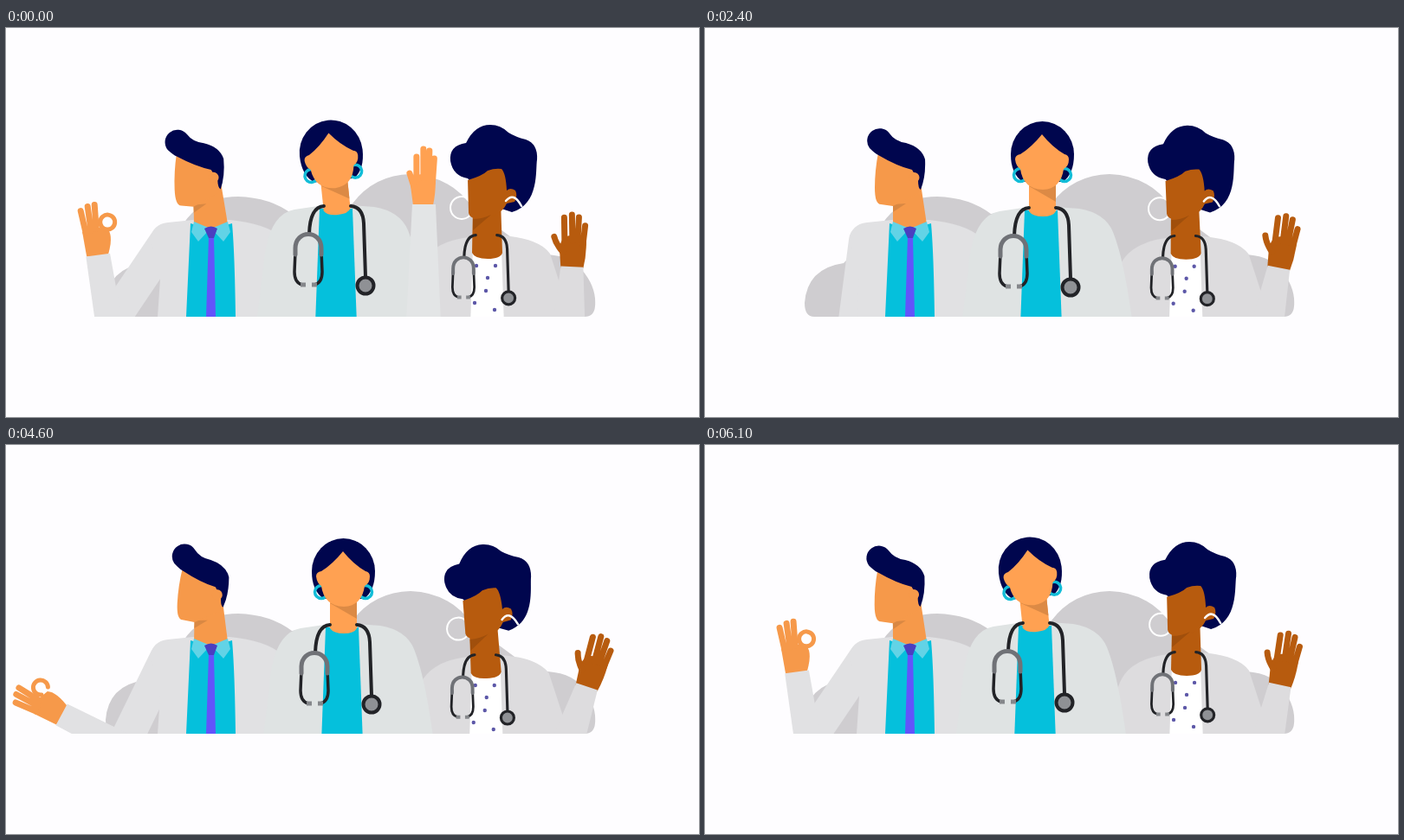
Recreate the animation shown at these times as an HTML page. Size 800 by 450 pixels, loop 6.2 s.

```html
<!DOCTYPE html>
<html lang="en">
<head>
<meta charset="utf-8">
<title>Three doctors waving</title>
<style>
  html, body { margin: 0; width: 100%; height: 100%; overflow: hidden; background: #fefdff; }
  svg { display: block; width: 100vw; height: 100vh; }
  .hair { fill: #00064e; }
  .skinA { fill: #f6994a; }
  .skinB { fill: #ffa152; }
  .skinC { fill: #b75b0e; }
  .teal { fill: #05c0dc; }
  .coatA { fill: #e1e1e3; }
  .coatB { fill: #dfe3e3; }
  .coatC { fill: #dddcde; }
  .line { fill: none; stroke-linecap: round; stroke-linejoin: round; }
  .finger { fill: none; stroke-linecap: round; stroke-width: 7; }
</style>
</head>
<body>
<svg viewBox="0 0 800 450">
  <defs>
    <clipPath id="ground"><rect width="800" height="334"/></clipPath>
    <g id="stethoscope">
      <path class="line" stroke="#222327" stroke-width="4" d="M1 0Q2 -31 18 -32M49 -32Q63 -31 64 -12L66 50"/>
      <path class="line" stroke="#222327" stroke-width="3.5" d="M-15 20L-16 44Q-16 57 -7 59M15 20L16 44Q16 57 7 59"/>
      <path class="line" stroke="#707277" stroke-width="5" stroke-linecap="butt" d="M-15 24V17C-15 -5 15 -5 15 17V24"/>
      <path stroke="#85878b" stroke-width="5" d="M-9 59H-3M4 59H10"/>
      <circle cx="66" cy="60" r="9.5" fill="#8f9195" stroke="#222327" stroke-width="4"/>
    </g>
  </defs>

  <g clip-path="url(#ground)">
    <path fill="#cfcdd0" d="M126 334Q115 334 115 318Q118 278 160 272L205 226Q225 195 268 195Q305 196 330 215L400 203Q425 170 467 169Q515 171 540 210L610 262Q650 260 665 280Q682 300 680 322Q679 334 668 334Z"/>

    <!-- man -->
    <path id="upperArm" class="line" stroke="#e1e1e3" stroke-width="38"/>
    <g id="manArm">
      <g transform="translate(0 -70) rotate(8)" fill="#f6994a" stroke="#f6994a">
        <path stroke="none" d="M-13 2L-18 -26Q-12 -35 0 -32L12 -29Q18 -20 11 2Z"/>
        <path class="finger" d="M-20 -51L-14 -25M-12 -56L-8 -28M-4 -58L-2 -30"/>
        <circle id="ring" class="line" cx="11" cy="-38" r="8.5" stroke-width="5" pathLength="100" transform="rotate(50 11 -38)"/>
      </g>
      <path class="coatA" d="M-14 -70H14L17 12H-14Z"/>
    </g>
    <path class="coatA" d="M175 334L178 290L167 246Q168 227 187 225L216 222H258Q300 226 318 242L340 334Z"/>
    <path id="manNeck" class="skinA" d="M217 200V234H257L249 180Z"/>
    <g id="manHead">
      <path fill="#d98843" d="M217 204L232 203L217 213Z"/>
      <path class="skinA" d="M200 144Q196 165 196 185Q196 204 203 204L217 206L249 190V165L239 158Z"/>
      <path class="hair" d="M200 147Q196 145 190 139A13 13 0 1 1 213 122Q219 131 232 133Q250 138 254 152Q255 172 249 187Q246 186 246 176L239 164Q222 160 200 147Z"/>
      <circle class="skinA" cx="241.5" cy="173" r="6"/>
    </g>
    <path class="teal" d="M213 226L236 233L261 226Q264 260 265 334H208Z"/>
    <path fill="#62d3e6" d="M217 224L236 232L222 247L214 236ZM256 224L237 232L251 247L259 236Z"/>
    <path fill="#6254fb" d="M234 241L231 334H242L240 241Z"/>
    <path fill="#4a3fc0" d="M229 232Q237 227 244 232L240 243H234Z"/>

    <!-- woman on the right -->
    <g id="rightBody">
      <path id="rightHair" class="hair" d="M533 174Q516 171 513 154Q511 136 531 133Q541 112 559 112Q571 112 580 121Q588 126 600 129Q614 134 613 152C611 164 616 204 584 213L560 205Z"/>
      <path class="coatC" d="M466 345L475 290Q480 248 535 242L572 240Q615 243 628 261L644 310L668 345Z"/>
      <path fill="#fff" d="M539 255L536 345H575L572 255Z"/>
      <path class="line" stroke="#5d58a8" stroke-width="4.4" d="M543 275h0M565 275h0M556 289h0M554 304h0M541 318h0M564 326h0"/>
      <g id="rightFace">
        <circle class="line" cx="526" cy="208" r="13" stroke="#fff" stroke-width="2"/>
        <path class="skinC" d="M539 205L538 260Q541 267 556 267T573 260L571 200Z"/>
        <path class="skinC" d="M533 176Q550 171 556 165Q564 162 572 163Q577 168 578 188Q582 184 588 188Q591 194 587 201L578 203Q570 220 545 221Q535 220 534 214Z"/>
        <path fill="#a04f0c" d="M539 221Q550 221 560 216L539 234Z"/>
        <path class="line" stroke="#fff" stroke-width="2.5" d="M577 200Q586 189 595 206"/>
      </g>
      <use href="#stethoscope" transform="translate(528 265) scale(.79)"/>
    </g>
    <g id="rightArm">
      <g transform="translate(0 -64) rotate(-4)" fill="#b75b0e" stroke="#b75b0e">
        <path stroke="none" d="M-13 2L-14 -20Q-13 -36 0 -36T17 -30Q17 -13 13 2Z"/>
        <path class="finger" d="M-20 -35Q-18 -26 -10 -17M-8 -57L-8 -28M1 -60V-30M9 -57L7 -30M16 -47L13 -25"/>
      </g>
      <path class="coatC" d="M-13 -64H13L19 8H-19Z"/>
    </g>

    <!-- woman in the middle -->
    <g id="midBody">
      <path class="coatB" d="M296 345L304 280Q308 218 340 212L374 207H405L432 209Q462 214 471 236Q484 268 494 345Z"/>
      <path class="teal" d="M369 211L364 345H412L407 211Z"/>
      <g id="midHead">
        <path class="hair" d="M353 146A36.5 38 0 0 1 426 146Q426 169 413 178H367Q353 169 353 146Z"/>
        <path class="skinB" d="M374 175V212Q378 218 390 218T405 212V175Z"/>
        <path fill="#dc8a45" d="M374 183L405 180V201Z"/>
        <g class="line" stroke="#12bdd8" stroke-width="3.5">
          <circle cx="364" cy="170" r="7.5"/><circle cx="415" cy="170" r="7.5"/>
        </g>
        <path class="skinB" d="M389 123Q377 138 364 146Q358 147 358 152Q359 160 364 163Q367 186 390 187Q411 186 414 163Q420 160 420 152Q420 147 415 146Q401 138 389 123Z"/>
      </g>
      <use href="#stethoscope" x="356" y="240"/>
    </g>
    <g id="midArm">
      <g id="midHand" fill="#ffa152" stroke="#ffa152">
        <path stroke="none" d="M-12 1L-15 -22Q-14 -35 0 -35T14 -28Q14 -12 11 1Z"/>
        <path class="finger" d="M-16 -36L-10 -17M-8 -55L-8 -28M0 -64V-30M7 -62L6 -30M12.5 -53L10.5 -25"/>
      </g>
      <path fill="#e3e5e6" d="M-13 -131H14L20 6H-20Z"/>
    </g>
  </g>
</svg>
<script>
const LOOP = 6200;
const el = id => document.getElementById(id);
const place = (id, x, y, angle = 0, px = 0, py = 0) =>
  el(id).setAttribute('transform', `translate(${x} ${y}) rotate(${angle} ${px} ${py})`);

function draw(t) {
  const ramp = (from, to) => {
    const u = Math.min(1, Math.max(0, (t - from) / (to - from)));
    return u * u * (3 - 2 * u);
  };
  const turn = t / LOOP * 2 * Math.PI;
  const wave = Math.sin(7 * turn);
  const sink = 1.5 - 1.6 * Math.cos(2 * turn + .3);

  // Man: head nods, arm swings out of view and back.
  const nod = -2.4 - 6 * Math.sin(turn) - 6.4 * Math.sin(2 * turn);
  const out = ramp(1150, 2000) - ramp(4250, 5000);
  const drop = ramp(1500, 2400) - ramp(4000, 4700);
  const pinchGap = 24 * (ramp(800, 1400) - ramp(5000, 5500));
  const elbowX = 116 + 2.5 * sink + 40 * drop;
  const elbowY = 332 + 3.5 * sink + 40 * drop;
  place('manHead', 0, 0, nod, 236, 218);
  place('manNeck', 0, 0, nod * .4, 237, 228);
  place('manArm', elbowX, elbowY, -5 - 3 * Math.cos(turn) - 104 * out);
  el('upperArm').setAttribute('d', `M185 246L${elbowX + 10} ${elbowY + 2}`);
  el('ring').setAttribute('stroke-dasharray', pinchGap ? `0 ${pinchGap} ${100 - pinchGap} 0` : 'none');

  // Middle: she leans while her arm is up.
  const lean = 1 - ramp(0, 1500) + ramp(5000, 6000);
  const swing = 114 * (1 + ramp(100, 750) - ramp(4800, 5600)) - 114 * (t < 2500 ? 1 : 0);
  place('midBody', -7 * lean, -2 * lean);
  place('midHead', 0, 0, -6 * lean, 390, 215);
  place('midArm', 482, 335 + Math.max(0, swing - 90), swing - 2 * wave);
  place('midHand', 0, -131, -13 * wave);

  // Right: body sinks and rises, hand keeps waving.
  const tilt = -.95 * sink;
  place('rightBody', -.4 * sink, sink);
  place('rightHair', 0, 0, tilt, 555, 262);
  place('rightFace', 0, 0, tilt, 555, 262);
  place('rightArm', 650, 340, 15 + 4 * wave - 12 * (1 - ramp(0, 400)));
}

function tick() {
  draw(performance.now() % LOOP);
  requestAnimationFrame(tick);
}
tick();
</script>
</body>
</html>
```
